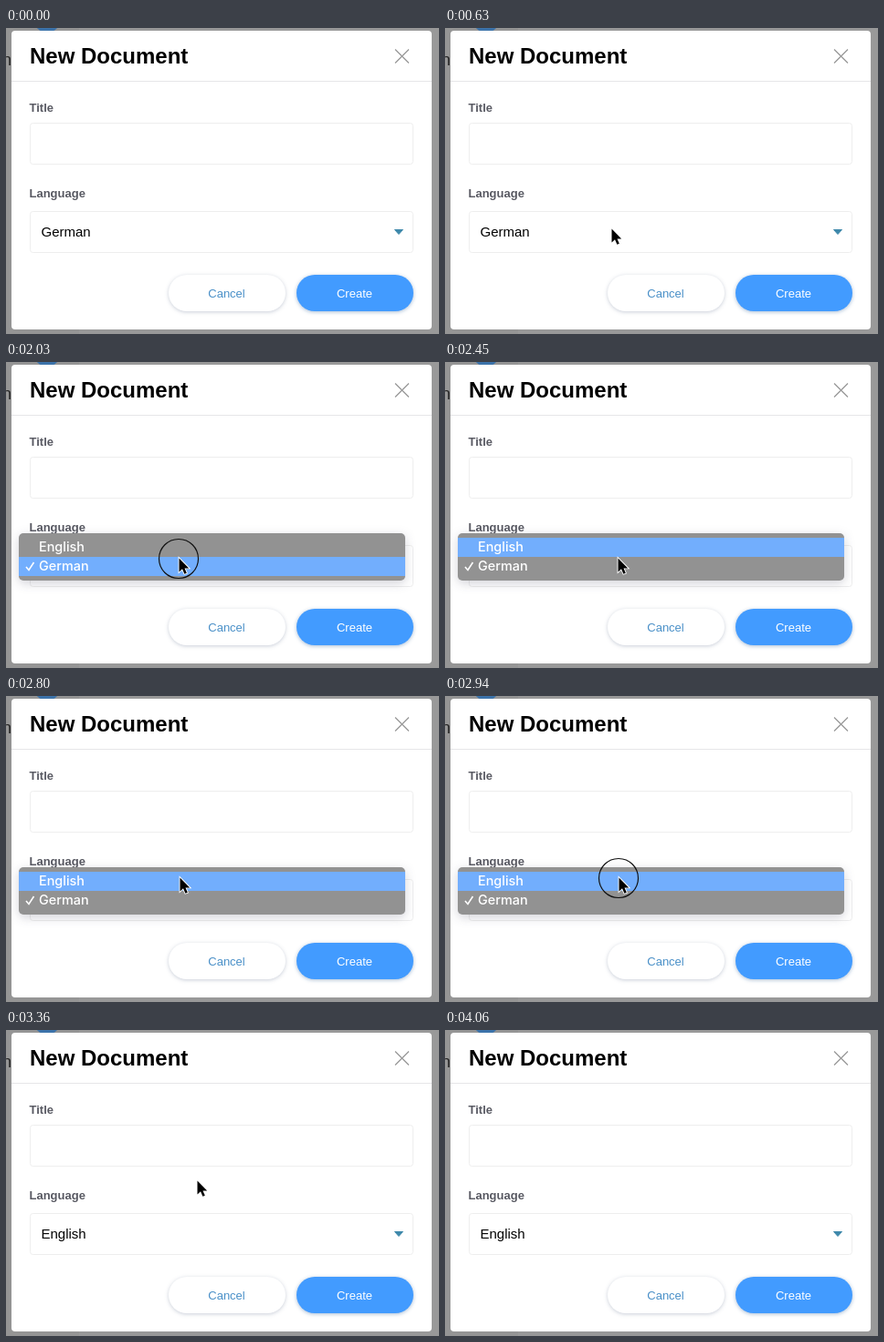
Write an HTML page that moves like this. It is 474 px wide and 336 px high and loops after 4410 ms.

```html
<!DOCTYPE html>
<html lang="en">
<head>
<meta charset="utf-8">
<title>New Document dialog</title>
<style>
html, body { margin: 0; width: 100%; height: 100%; overflow: hidden; background: #999; }
svg { display: block; width: 474px; height: 336px; font-family: "Liberation Sans", Arial, sans-serif; }
.title { font-weight: 700; font-size: 24px; }
.label { font-weight: 700; font-size: 13px; fill: #585962; }
.value { font-size: 15px; }
.button { font-size: 13px; text-anchor: middle; }
.item { font: 500 14.4px Inter, Roboto, sans-serif; fill: #fff; }
.field { fill: #fff; stroke: #eee; }
.cancel { fill: #fff; filter: drop-shadow(0 1px 2px rgba(40, 60, 100, .25)); }
.create { fill: #429bff; filter: drop-shadow(0 1px 2px rgba(40, 90, 150, .4)); }
.panel { fill: #929292; filter: drop-shadow(0 3px 6px rgba(30, 30, 60, .2)); }

/* 63 ticks of 70 ms per loop */
.anim { animation: 4410ms step-end infinite; }
#cursor { animation-name: move; }
#ring { animation-name: click; }
#menu { animation-name: menu; }
#pick { animation-name: pick; }
#before { animation-name: before; }
#after { animation-name: after; }

@keyframes move {
  0% { opacity: 0; transform: translate(203px, 289px); }
  1.58% { opacity: 1; transform: translate(203px, 289px); animation-timing-function: steps(4); }
  7.93% { opacity: 1; transform: translate(187px, 236px); animation-timing-function: steps(4); }
  14.28%, 23.8% { opacity: 1; transform: translate(182px, 221px); }
  23.8% { animation-timing-function: steps(6); }
  33.33%, 39.68% { opacity: 1; transform: translate(189px, 186px); }
  39.68% { animation-timing-function: steps(3); }
  44.44%, 52.38% { opacity: 1; transform: translate(189px, 216px); }
  52.38% { animation-timing-function: steps(7); }
  63.49%, 69.84% { opacity: 1; transform: translate(190px, 200px); }
  69.84% { animation-timing-function: steps(4); }
  76.19% { opacity: 1; transform: translate(209px, 166px); }
  88.88% { opacity: 1; transform: translate(206px, 222px); }
  90.47% { opacity: 1; transform: translate(200px, 308px); }
  92.06%, 100% { opacity: 0; transform: translate(200px, 308px); }
}
@keyframes click {
  0%, 17.46%, 36.5%, 47.61%, 68.25%, 80.95%, 100% { opacity: 0; }
  15.87%, 34.92%, 44.44%, 65.07%, 77.77% { opacity: 1; }
}
@keyframes menu {
  0%, 73.01%, 100% { opacity: 0; }
  46.03% { opacity: 1; }
  68.25% { opacity: .75; }
  69.84% { opacity: .41; }
  71.42% { opacity: .18; }
}
@keyframes pick {
  0% { transform: translateY(21px); }
  55.55%, 100% { transform: none; }
}
@keyframes before {
  0% { opacity: 1; }
  73.01%, 100% { opacity: 0; }
}
@keyframes after {
  0% { opacity: 0; }
  73.01%, 100% { opacity: 1; }
}
</style>
</head>
<body>
<svg viewBox="0 0 474 336">
  <!-- dimmed page -->
  <rect width="474" height="336" fill="#999"/>
  <rect width="80" height="336" fill="#959595"/>
  <circle cx="45" cy="-10" r="15" fill="#3c73aa"/>
  <text x="-4" y="41" font-size="18" fill="#222">n</text>

  <!-- dialog -->
  <rect x="6" y="3" width="460" height="328" rx="4" fill="#fff"/>
  <text class="title" x="26" y="39">New Document</text>
  <path d="M426 23.5l15 15m0-15l-15 15" stroke="#999" stroke-width="1.3"/>
  <path d="M6 58.5h460" stroke="#e6e6e8"/>
  <text class="label" x="25.5" y="92">Title</text>
  <rect class="field" x="26.5" y="104.5" width="419" height="45" rx="3"/>
  <text class="label" x="25.5" y="186">Language</text>
  <rect class="field" x="26.5" y="201.5" width="419" height="45" rx="3"/>
  <text class="value anim" id="before" x="38.5" y="229">German</text>
  <text class="value anim" id="after" x="38.5" y="229">English</text>
  <path d="M425.5 221.5h9l-4.5 5z" fill="#3f89ab" stroke="#3f89ab" stroke-linejoin="round"/>
  <rect class="cancel" x="178" y="271" width="128" height="40" rx="20"/>
  <text class="button" x="241.5" y="296" fill="#4a90c8">Cancel</text>
  <rect class="create" x="318" y="271" width="128" height="40" rx="20"/>
  <text class="button" x="381.5" y="296" fill="#fff">Create</text>

  <g class="anim" id="menu">
    <rect class="panel" x="14" y="188" width="423" height="52" rx="5"/>
    <rect class="anim" id="pick" x="14" y="193" width="423" height="21" fill="#72aefd"/>
    <text class="item" x="36" y="208">English</text>
    <text class="item" x="36" y="229">German</text>
    <path d="M22 225l3 3.5 5.5-8.5" fill="none" stroke="#fff" stroke-width="1.6"/>
  </g>

  <g class="anim" id="cursor">
    <circle class="anim" id="ring" r="21.5" fill="none" stroke="#111" stroke-width="1.2"/>
    <path d="M.5-.5v15l3.5-3.2 2.4 5.4 2.4-1-2.3-5.3h4.7z" stroke="#fff" stroke-width="1.8" paint-order="stroke"/>
  </g>
</svg>
</body>
</html>
```
